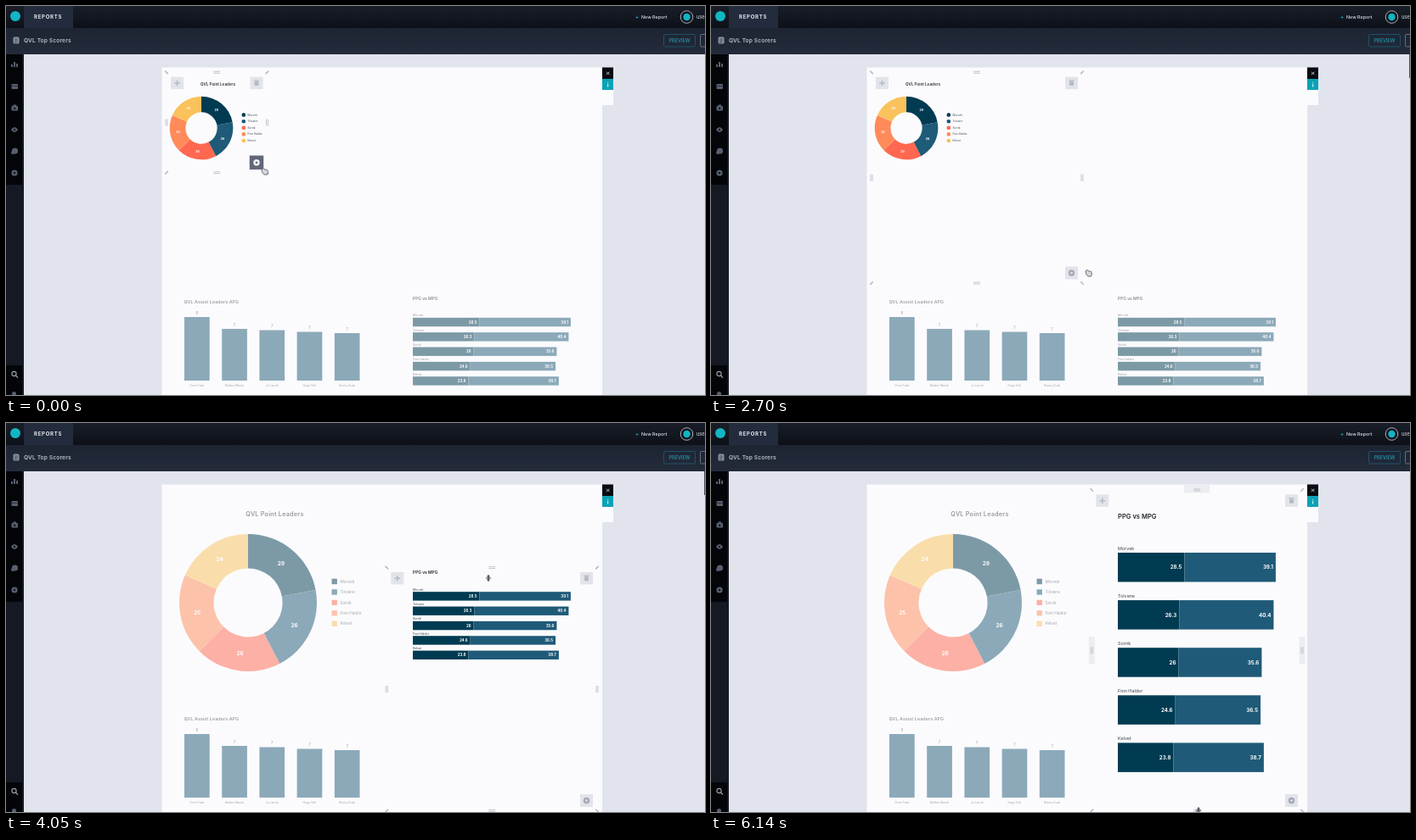
An HTML page for the animation above (6380 ms loop, 823x459 px).

```html
<!DOCTYPE html>
<html lang="en">
<head>
<meta charset="utf-8">
<title>Report editor</title>
<style>
html, body { margin: 0; width: 100%; height: 100%; overflow: hidden; background: #e1e4ed; }
svg { display: block; width: 100vw; height: 100vh; font-family: Inter, "Open Sans", sans-serif; }
</style>
</head>
<body>
<svg id="stage" viewBox="0 0 823 459" xmlns="http://www.w3.org/2000/svg">
  <defs>
    <linearGradient id="top" x2="0" y2="1">
      <stop offset="0" stop-color="#191e29"/><stop offset="1" stop-color="#0d1017"/>
    </linearGradient>
    <linearGradient id="sub" x2="0" y2="1">
      <stop offset="0" stop-color="#1d2432"/><stop offset="1" stop-color="#232b3b"/>
    </linearGradient>
  </defs>
  <g id="shell"></g>
  <g id="board"></g>
</svg>
<script>
const LOOP = 6380;
const COLORS = ['#003b52', '#1f5a78', '#ff6850', '#ff8a5a', '#f9c25c'];
const PLAYERS = [
  ['Morvek', 28.5, 39.1], ['Tolvane', 26.3, 40.4], ['Sorrik', 26, 35.6],
  ['Finn Haldor', 24.6, 36.5], ['Kelvet', 23.8, 38.7]
];
const ASSISTS = [
  ['Orvin Task', 75, 9], ['Belden Marsk', 61, 7], ['Jo Larvik', 59.5, 7],
  ['Hugo Velt', 57.5, 7], ['Ronny Dusk', 56, 7]
];
// time, x, y, shape
const CURSOR = [
  [0, 304, 195, 'hand'], [1350, 307, 197, 'arrow'], [1500, 308, 197, 'arrow'],
  [2250, 438, 327, 'hand'], [2700, 444, 315, 'hand'], [3150, 535, 329, 'arrow'],
  [3450, 568, 337, 'move'], [3600, 568, 337, 'move'], [4350, 568, 80, 'move'],
  [4500, 541, 100, 'move'], [4800, 549, 122, 'arrow'], [5100, 557, 145, 'arrow'],
  [5540, 603, 450, 'arrow'], [5840, 590, 453, 'arrow'], [6140, 574, 457, 'move']
];
const FADE = [[3150, 1], [3300, .5], [4200, .5], [4500, .82], [4800, .5]];

const lerp = (a, b, k) => a + (b - a) * k;
const part = (t, a, b) => Math.min(1, Math.max(0, (t - a) / (b - a)));
const ease = k => k * k * (3 - 2 * k);

function track(keys, t) {
  let i = 0;
  while (i < keys.length - 1 && t >= keys[i + 1][0]) i++;
  const a = keys[i], b = keys[i + 1] || a;
  const k = a === b ? 0 : part(t, a[0], b[0]);
  return a.map((v, j) => typeof v === 'number' ? lerp(v, b[j], k) : v);
}

const rect = (x, y, w, h, fill, extra = '') =>
  `<rect x="${x}" y="${y}" width="${w}" height="${h}" fill="${fill}" ${extra}/>`;
const disc = (x, y, r, fill, extra = '') =>
  `<circle cx="${x}" cy="${y}" r="${r}" fill="${fill}" ${extra}/>`;
const line = (d, color, w = 1) =>
  `<path d="${d}" fill="none" stroke="${color}" stroke-width="${w}"/>`;
// y is the middle of the capitals
const text = (s, x, y, size, fill, extra = '') =>
  `<text x="${x}" y="${y + size * .36}" font-size="${size}" fill="${fill}" ${extra}>${s}</text>`;
const group = (body, opacity) => `<g opacity="${opacity}">${body}</g>`;
const BOLD = 'font-weight="700"', MID = 'text-anchor="middle"', END = 'text-anchor="end"';

function shell() {
  const gray = '#566071';
  let s = rect(0, 0, 823, 459, '#e1e4ed') +
    rect(0, 0, 823, 26, 'url(#top)') + rect(21, 0, 58, 26, '#222c3d') +
    rect(0, 26, 823, 31, 'url(#sub)') +
    rect(0, 57, 21, 402, '#141923') + rect(0, 57, 19, 154, '#040508') +
    rect(0, 424, 19, 35, '#040508');
  s += disc(11, 12, 6, '#12b5c4') +
    text('REPORTS', 33, 13, 6, '#e6e9ef', BOLD + ' letter-spacing=".75"') +
    text('+', 741, 13, 6, '#18a9ba', BOLD) +
    text('New Report', 748, 13, 5.4, '#dfe3ea', 'font-weight="500"') +
    disc(801.5, 13, 7.3, '#10151d', 'stroke="#aab2bd" stroke-width="1"') +
    disc(801.5, 13, 4.2, '#12b5c4') + text('user', 813, 13, 5.6, '#dfe3ea');
  s += rect(8.5, 36.5, 7, 8, '#8b94a3', 'rx="1.5"') + line('M10 39h4M10 41h4M10 43h3', '#343d4d', .8) +
    text('QVL Top Scorers', 21, 41, 6.6, '#b9c0cb', 'font-weight="600" letter-spacing=".15"') +
    rect(774.5, 33.5, 37, 14.5, 'none', 'rx="1.5" stroke="#1d5365"') +
    text('PREVIEW', 793, 41, 5.5, '#238ba0', MID + ' font-weight="600"') +
    rect(817.5, 33.5, 12, 14.5, 'none', 'rx="1.5" stroke="#667080"');
  s += line('M7 72v-3M10 72v-6M13 72v-4', gray, 2) +
    rect(6.5, 92, 7.5, 6, gray, 'rx="1"') + line('M7 94.5h7', '#1a202b', .7) +
    rect(6.5, 118, 7.5, 5.5, gray, 'rx="1"') + rect(8.5, 116.5, 3.5, 2, gray) + disc(10.2, 120.7, 1.3, '#11161f') +
    `<path d="M6 146q4-6 8 0q-4 6-8 0" fill="${gray}"/>` + disc(10, 146, 1.2, '#11161f') +
    disc(10.5, 171, 3.6, gray) + disc(8, 173, 2, gray) +
    disc(10, 197, 3.6, gray) + disc(10, 197, 1.3, '#11161f') +
    disc(9.5, 434, 2.6, 'none', 'stroke="#9aa2b0" stroke-width="1.1"') + line('M11.5 436l2.5 2.7', '#9aa2b0', 1.2) +
    disc(9.5, 457.5, 2.5, gray);
  s += rect(183.5, 72.5, 518.5, 387, '#fbfbfd') +
    rect(702, 72.5, 13, 13.5, '#080b12') + rect(702, 86, 13, 13, '#0aa2b5') + rect(702, 99, 13, 18, '#fafbfd') +
    line('M707 77.7l3.4 3.4m0-3.4l-3.4 3.4', '#c5c9d0', 1) + line('M708.6 90v1m0 1v3.4', '#b9f0f3', 1.3);
  return s;
}

function donut(cx, cy, R, sweep) {
  const sum = PLAYERS.reduce((a, p) => a + p[1], 0), r = R / 2;
  const at = (rad, a) => `${cx + rad * Math.sin(a)} ${cy - rad * Math.cos(a)}`;
  let a = 0, out = '', nums = '';
  PLAYERS.forEach(([, v], i) => {
    const b = a + v / sum * Math.PI * 2 * sweep, m = (a + b) / 2, q = R * .75;
    out += `<path fill="${COLORS[i]}" d="M${at(R, a)}A${R} ${R} 0 0 1 ${at(R, b)}L${at(r, b)}A${r} ${r} 0 0 0 ${at(r, a)}Z"/>`;
    nums += text(Math.round(v), cx + q * Math.sin(m), cy - q * Math.cos(m),
      R > 50 ? 6.5 : 3.6, '#fff', MID + ' ' + BOLD);
    a = b;
  });
  return out + (sweep === 1 ? nums : '');
}

function pointChart(big, sweep) {
  const [cx, cy, R] = big ? [285, 212, 81] : [230, 144, 37.3];
  const [lx, ly, gap, box] = big ? [386.7, 187, 12.45, 6.4] : [279.8, 128.5, 7.6, 4.4];
  let s = big
    ? text('QVL Point Leaders', 316.5, 107, 7.2, '#363c47', MID + ' font-weight="600" letter-spacing=".25"')
    : text('QVL Point Leaders', 249.5, 92, 4.6, '#30343d', MID + ' font-weight="600"');
  s += donut(cx, cy, R, sweep);
  PLAYERS.forEach(([name], i) => {
    const y = ly + i * gap;
    s += rect(lx - box / 2, y - box / 2, box, box, COLORS[i], `rx="${big ? .5 : 1.6}"`) +
      text(name, big ? 393.5 : 284.5, y, big ? 4.7 : 3.2, '#4a505b');
  });
  return s;
}

function assistChart() {
  let s = text('QVL Assist Leaders APG', 209.5, 349, 5.4, '#30343d', 'font-weight="500" letter-spacing=".08"');
  ASSISTS.forEach(([name, h, v], i) => {
    const x = 210 + i * 44.2;
    s += rect(x, 442 - h, 29.7, h, COLORS[1]) +
      text(v, x + 14.8, 437 - h, 4.2, '#30343d', MID) +
      text(name, x + 14.8, 447.7, 3.4, '#4a505b', MID);
  });
  return s;
}

// top is the upper edge of the widget
function minuteChart(top, big, grow) {
  const [ty, y0, gap, h, ly, fs, ls] = big
    ? [31, 74, 56.1, 34.5, -5, 6.2, 5.4] : [5.8, 28.6, 17.35, 10.4, -2.8, 4.4, 3.5];
  let s = text('PPG vs MPG', 479, top + ty, big ? 7.6 : 4.9, '#23272f', 'font-weight="600"');
  PLAYERS.forEach(([name, p, m], i) => {
    const y = top + y0 + i * gap, a = p * 2.75 * grow, b = m * 2.75 * grow;
    s += text(name, 479, y + ly, ls, '#3b414c') +
      rect(479, y, a, h, COLORS[0]) + rect(479 + a, y, b, h, COLORS[1]);
    if (grow === 1) s += text(p, 476 + a, y + h / 2, fs, '#fff', END + ' ' + BOLD) +
      text(m, 476 + a + b, y + h / 2, fs, '#fff', END + ' ' + BOLD);
  });
  return s;
}

function frame(x1, y1, x2, y2, hotGear, pads) {
  const mx = (x1 + x2) / 2, my = (y1 + y2) / 2, ink = '#b3b7c1', pad = '#ecedf1', btn = '#e2e4ea';
  let s = '';
  if (pads) s += rect(mx - 15, y1 - 6, 30, 9.5, pad) +
    rect(x1 - 3.5, my - 16, 7, 32, pad) + rect(x2 - 3.5, my - 16, 7, 32, pad);
  for (const [x, y, d] of [[x1, y1, 1], [x2, y1, -1], [x1, y2, -1], [x2, y2, 1]])
    s += line(`M${x - 1.8} ${y - 1.8 * d}L${x + 1.8} ${y + 1.8 * d}`, ink, 1.5);
  for (const y of [y1, y2]) s += line(`M${mx - 4} ${y - 1}h8m-8 2h8`, ink, .8);
  for (const x of [x1, x2]) s += line(`M${x - 1} ${my - 4}v8m2-8v8`, ink, .8);
  const l = x1 + 12.5, r = x2 - 12.5, t = y1 + 12.7, b = y2 - 12;
  for (const x of [l, r]) s += rect(x - 7.5, t - 7.3, 15, 14.5, btn);
  s += line(`M${l - 3.3} ${t}h6.6m-3.3-3.3v6.6`, '#b5b9c5', 1.5) +
    rect(r - 2.5, t - 2, 5, 5, '#b5b9c5', 'rx="1"') + line(`M${r - 3.3} ${t - 3}h6.6`, '#b5b9c5', 1.2);
  const w = hotGear ? 16.5 : 15;
  return s + rect(r - w / 2, b - w / 2, w, w, hotGear ? '#64677a' : btn) +
    disc(r, b, 3.7, hotGear ? '#f2f3f6' : '#a5a9b6') + disc(r, b, 1.3, hotGear ? '#64677a' : btn);
}

function cursor(x, y, kind) {
  const shapes = {
    arrow: '<path d="M-1-3v7l1.6-1.5 1.2 2.4 1.2-.6-1.1-2.3h2z" fill="#2b2d36" stroke="#fff" stroke-width=".4"/>',
    hand: '<path d="M-3-2.5l2-1 2 1.5 2.5.2 1 2.3-1 3.5h-3.5l-2.5-3z" fill="#d6d8de" stroke="#5e626d" stroke-width=".9"/>',
    move: '<path d="M0-4l2.2 2.6h-1.3v1h2.3v1.2h-2.3v1h1.3l-2.2 2.6-2.2-2.6h1.3v-1h-2.3v-1.2h2.3v-1h-1.3z" fill="#555963"/>'
  };
  return `<g transform="translate(${x} ${y})">${shapes[kind]}</g>`;
}

function board(t) {
  const dim = t < 3150 ? 1 : track(FADE, t)[1];
  const pull = ease(part(t, 1500, 2250)), lift = ease(part(t, 3600, 4350));
  const top = lerp(339.2, 79, lift), big = t >= 2850;
  const sweep = big ? ease(part(t, 2850, 3150)) : 1;
  let s = group(pointChart(big, sweep), dim) + group(assistChart(), t < 3150 ? .5 : dim);

  if (t < 4650) s += group(minuteChart(top, false, 1), t < 3300 ? .5 : 1);
  else if (t < 4950) s += group(minuteChart(top, false, 1), 1 - part(t, 4500, 4950));
  else if (t > 5100) s += minuteChart(top, true, ease(part(t, 5100, 5540)));

  if (t < 3300) s += frame(189, 78.3, lerp(307.5, 437, pull), lerp(196.7, 327, pull), t < 1650, false);
  else s += frame(448.3, top, 696, 457.5, false, t >= 4650);

  if (t >= 1350 && t < 4800) s += rect(822, 57, 1, 28, '#4c505b');
  const [, x, y, kind] = track(CURSOR, t);
  return s + cursor(x, y, kind);
}

function hold(t) {
  if (t < 1350) return 0;
  const from = t < 5540 ? 0 : 5540;
  return Math.min(6140, from + Math.floor((t - from) / 150) * 150);
}

const layer = document.getElementById('board');
document.getElementById('shell').innerHTML = shell();
let start = null, shown = -1;

function draw(now) {
  if (start === null) start = now;
  const t = hold((now - start) % LOOP);
  if (t !== shown) layer.innerHTML = board(shown = t);
  requestAnimationFrame(draw);
}
layer.innerHTML = board(0);
requestAnimationFrame(draw);
</script>
</body>
</html>
```
